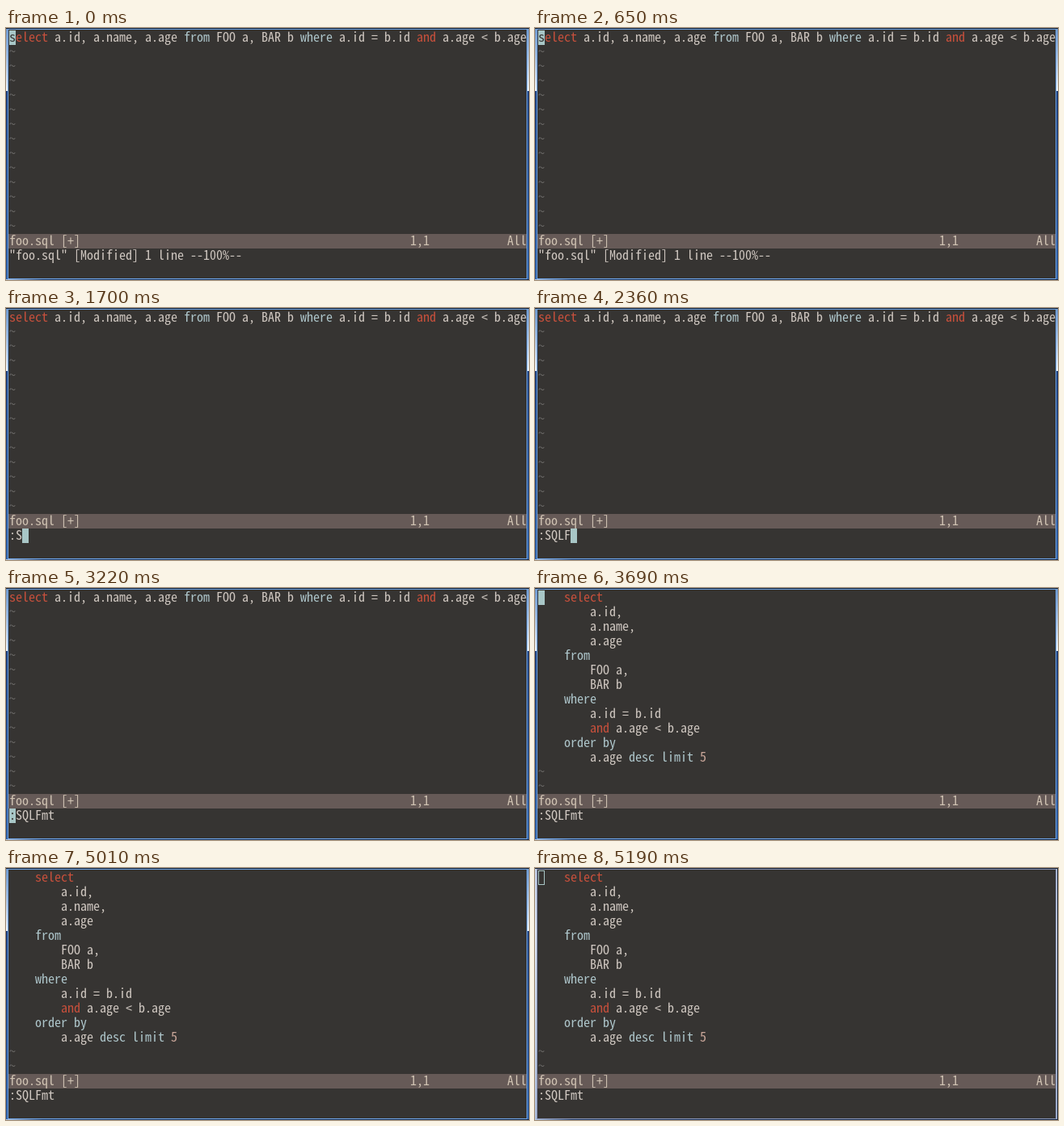
An HTML page with a canvas for the animation above (5.25 s loop, 647 by 312 pixels).

```html
<!DOCTYPE html>
<html>
<head>
<meta charset="utf-8">
<style>
html, body { margin: 0; width: 647px; height: 312px; overflow: hidden; }
canvas { display: block; }
</style>
</head>
<body>
<canvas id="stage" width="647" height="312"></canvas>
<script>
const ctx = document.getElementById('stage').getContext('2d', { alpha: false });
const LOOP = 5250, CELL = 8, ROW = 18, LEFT = 4, TOP = 3;
const BG = '#363432', FG = '#cfc7c0', CURSOR = '#a8c6c6';
const RED = '#c8503c', CYAN = '#aec6cb', PINK = '#cba79a', TILDE = '#6a6866';
const BAR = '#665a57', BAR_FG = '#cfc2b2';
const QUERY = 'select a.id, a.name, a.age from FOO a, BAR b where a.id = b.id and a.age < b.age';
const FORMATTED = `    select
        a.id,
        a.name,
        a.age
    from
        FOO a,
        BAR b
    where
        a.id = b.id
        and a.age < b.age
    order by
        a.age desc limit 5`.split('\n');
const FORMAT_AT = 3690, BLUR_AT = 5190;
const COMMAND = ':SQLFmt', KEYS = [960, 1700, 1880, 2050, 2360, 2540, 2660];
// Each entry: time, cursor column, cursor row (no column means hidden).
const CURSORS = [
  [0, 0, 0], [370], [650, 0, 0], [960, 1, 15], [1640],
  ...KEYS.slice(1).map((t, i) => [t, i + 2, 15]),
  [3220, 0, 15], [FORMAT_AT, 0, 0], [4400], [4650, 0, 0], [5010], [BLUR_AT, 0, 0]
];

// Pick the font size whose advance fills one terminal cell.
const FAMILY = '"Noto Sans Mono CJK JP", "Noto Sans Mono", "DejaVu Sans Mono", monospace';
ctx.font = `100px ${FAMILY}`;
const FONT = `${CELL * 100 / ctx.measureText('0').width}px ${FAMILY}`;

function rect(color, x, y, w, h) {
  ctx.fillStyle = color;
  ctx.fillRect(x, y, w, h);
}

function text(str, col, row, color = FG) {
  ctx.fillStyle = color;
  [...str].forEach((ch, i) => ctx.fillText(ch, LEFT + (col + i) * CELL, TOP + row * ROW + 14));
}

function sql(line, row) {
  for (const { 0: word, index } of line.matchAll(/\S+/g)) {
    const color = /^(select|and)$/.test(word) ? RED
      : /^(from|where|order|by|desc|limit)$/.test(word) ? CYAN
      : /^\d+$/.test(word) ? PINK : FG;
    text(word, index, row, color);
  }
}

function gradient(x, y, stops) {
  const g = ctx.createLinearGradient(0, 0, x, y);
  stops.forEach(s => g.addColorStop(...s));
  return g;
}

function desktop(active) {
  const sides = active
    ? [[0, '#6d93c4'], [.25, '#eef4fb'], [.25, '#1d3d78'], [1, '#2d5ca0']]
    : [[0, '#c3cfe6'], [.25, '#dfe6f4'], [1, '#aebfdc']];
  rect(gradient(0, 312, sides), 0, 0, 647, 312);
  rect('#141c2c', 0, 0, 647, 1);
  rect(gradient(647, 0, [[0, '#b4c8e4'], [.07, '#223a62'], [1, '#18263f']]), 0, 311, 647, 1);
  if (!active) rect('#1a2436', 646, 0, 1, 312);
  rect(active ? '#6fa6ea' : '#8794b8', 2, 1, 643, 310);
  rect(BG, 3, 2, 641, 308);
}

function draw(t) {
  desktop(t < BLUR_AT);
  ctx.font = FONT;
  const lines = t < FORMAT_AT ? [QUERY] : FORMATTED;
  lines.forEach(sql);
  for (let row = lines.length; row < 14; row++) text('~', 0, row, TILDE);

  rect(BAR, 3, TOP + 14 * ROW, 641, ROW);
  text('foo.sql [+]', 0, 14, BAR_FG);
  text('1,1', 62, 14, BAR_FG);
  text('All', 77, 14, BAR_FG);
  const typed = COMMAND.slice(0, KEYS.filter(k => k <= t).length);
  const message = typed || '"foo.sql" [Modified] 1 line --100%--';
  text(message, 0, 15);

  const [, col, row] = CURSORS.filter(c => c[0] <= t).pop();
  if (col === undefined) return;
  const x = LEFT + col * CELL, y = TOP + row * ROW;
  if (t >= BLUR_AT) {
    ctx.strokeStyle = CURSOR;
    ctx.lineWidth = 1;
    ctx.strokeRect(x + .5, y + .5, CELL - 1, ROW - 1);
  } else {
    rect(CURSOR, x, y, CELL, ROW);
    text((row ? message : lines[0])[col] || ' ', col, row, BG);
  }
}

const start = performance.now();
function frame() {
  draw((performance.now() - start) % LOOP);
  requestAnimationFrame(frame);
}
frame();
</script>
</body>
</html>
```
